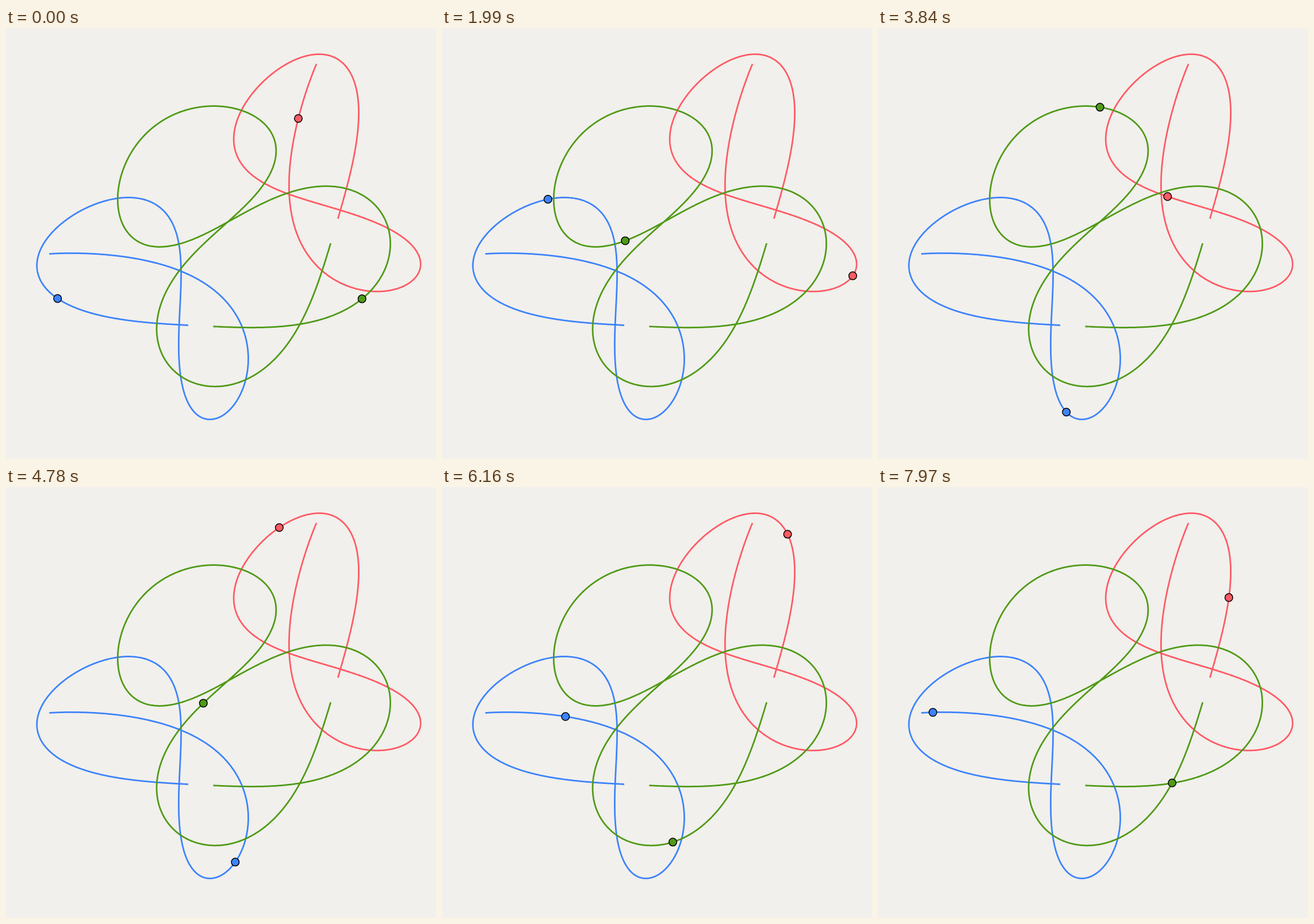
An HTML page that plays this animation: 748x749 px, repeating every 7990 ms.

```html
<!DOCTYPE html>
<html lang="en">
<head>
<meta charset="utf-8">
<title>Three-body orbit</title>
<style>
  html, body { margin: 0; width: 100%; height: 100%; overflow: hidden; background: #f1f0ec; }
  svg { display: block; width: 100%; height: 100%; }
  polyline { fill: none; stroke-width: 2.75; stroke-linejoin: round; }
  circle { stroke: #000; stroke-width: 1.5; }
</style>
</head>
<body>
<svg id="stage" viewBox="0 0 748 749"></svg>
<script>
const start = performance.now();
const LOOP = 7990;
const DT = 4;
const CENTER = [405.83, 366];
const COLORS = ['#509a17', '#ff5a65', '#3d83fc']; // green, red, blue
const PAINT_ORDER = [1, 2, 0];

// Three equal masses under gravity. The orbit is mirror-symmetric in time about `mid`,
// and runs back along itself when two bodies collide, `turn` ms after `mid`.
// [apex distance, half gap, apex speed, gravity, axis angle, mid, turn]
const GUESS = [241, 215.5, 0.172, 19.4, -2.1874, 3184, 4282];
const UNIT = [0.5, 0.5, 0.0005, 0.05, 0.002, 2, 2];

// Waypoints: time, then x, y of green, red and blue (null = free).
const WAYPOINTS = [
  [-1050, null, null, 539.8, 62.2, null, null],
  [0, 618.5, 471, 508.5, 156, 90.5, 471],
  [1290, 515, 279.5, 627.5, 456.5, 75, 362],
  [2690, 207.5, 237, 707.5, 379, 303, 482],
  [3840, 390, 138, 499.5, 291, 328.5, 668.5],
  [4780, 344, 375, 475.5, 70.5, 398.5, 652.5],
  [6160, 399.5, 618, 601, 81, 217.5, 399],
  [7420, null, null, null, null, 75.2, 392.2],
  [7970, 511.5, 514, 610.5, 192.5, 95.5, 391]
];

function attract(pos, gravity, acc) {
  acc.fill(0);
  for (let i = 0; i < 4; i += 2) {
    for (let j = i + 2; j < 6; j += 2) {
      const dx = pos[j] - pos[i], dy = pos[j + 1] - pos[i + 1];
      const sq = dx * dx + dy * dy;
      const f = gravity / (sq * Math.sqrt(sq));
      acc[i] += f * dx; acc[i + 1] += f * dy;
      acc[j] -= f * dx; acc[j + 1] -= f * dy;
    }
  }
}

// Positions every DT ms from `mid` on; x runs along the symmetry axis.
function simulate([g, h, v, gravity], duration) {
  const u = 0.75 * g * v / h; // zero total angular momentum
  const pos = [g, 0, -g / 2, h, -g / 2, -h];
  const vel = [0, v, u, -v / 2, -u, -v / 2];
  const acc = [0, 0, 0, 0, 0, 0];
  const track = [pos.slice()];
  attract(pos, gravity, acc);
  for (let t = 0; t < duration; t += DT) {
    for (let i = 0; i < 6; i++) {
      vel[i] += acc[i] * DT / 2;
      pos[i] += vel[i] * DT;
    }
    attract(pos, gravity, acc);
    for (let i = 0; i < 6; i++) vel[i] += acc[i] * DT / 2;
    track.push(pos.slice());
    if (Math.hypot(pos[0] - pos[2], pos[1] - pos[3]) < 22) {
      const x = (pos[0] + pos[2]) / 2, y = (pos[1] + pos[3]) / 2;
      track.push([x, y, x, y, pos[4], pos[5]]);
      break;
    }
  }
  return track;
}

function phase(t, [, , , , , mid, turn]) {
  const age = Math.abs(t - mid);
  return Math.min(age, 2 * turn - age);
}

// Stage coordinates of green, red and blue at time t.
function locate(t, orbit, track) {
  const [, , , , angle, mid] = orbit;
  const last = track.length - 1;
  const at = Math.max(0, Math.min(phase(t, orbit) / DT, last));
  const i = Math.floor(at), a = track[i], b = track[Math.min(i + 1, last)];
  let p = a.map((x, n) => x + (b[n] - x) * (at - i));
  if (t < mid) p = [p[0], -p[1], p[4], -p[5], p[2], -p[3]];
  const c = Math.cos(angle), s = Math.sin(angle);
  const out = [];
  for (let n = 0; n < 6; n += 2) {
    out.push(CENTER[0] + p[n] * c - p[n + 1] * s, CENTER[1] + p[n] * s + p[n + 1] * c);
  }
  return out;
}

const dot = (a, b) => a.reduce((sum, x, i) => sum + x * b[i], 0);

function solve(a, b) {
  const n = b.length;
  for (let i = 0; i < n; i++) {
    for (let r = i + 1; r < n; r++) {
      const f = a[r][i] / a[i][i];
      for (let c = i; c < n; c++) a[r][c] -= f * a[i][c];
      b[r] -= f * b[i];
    }
  }
  for (let i = n - 1; i >= 0; i--) {
    for (let c = i + 1; c < n; c++) b[i] -= a[i][c] * b[c];
    b[i] /= a[i][i];
  }
  return b;
}

// Damped least squares through the waypoints that lie within `reach` ms of `mid`.
function refine(orbit, reach) {
  const used = WAYPOINTS.filter(([t]) => phase(t, GUESS) <= reach);
  const errors = q => {
    const track = simulate(q, reach + 60);
    return used.flatMap(([t, ...goal]) => {
      const p = locate(t, q, track);
      return goal.map((x, i) => x === null ? 0 : p[i] - x);
    });
  };
  let damping = 1, best = errors(orbit);
  for (let round = 0; round < 12; round++) {
    const slopes = orbit.map((_, i) => {
      const q = orbit.slice();
      q[i] += UNIT[i];
      return errors(q).map((e, n) => e - best[n]);
    });
    const normal = slopes.map((a, i) => slopes.map((b, j) => dot(a, b) + (i === j ? damping : 0)));
    const delta = solve(normal, slopes.map(a => -dot(a, best)));
    const next = orbit.map((x, i) => x + delta[i] * UNIT[i]);
    const trial = errors(next);
    if (dot(trial, trial) < dot(best, best)) {
      orbit = next;
      best = trial;
      damping /= 4;
    } else {
      damping *= 4;
    }
  }
  return orbit;
}

const orbit = [1000, 2000, 3300, 4300].reduce(refineStage, GUESS);
function refineStage(current, reach) { return refine(current, reach); }

const [mid, turn] = orbit.slice(5);
const track = simulate(orbit, turn + 20);
const stage = document.getElementById('stage');

function add(tag, attributes) {
  const node = document.createElementNS(stage.namespaceURI, tag);
  for (const name in attributes) node.setAttribute(name, attributes[name]);
  return stage.appendChild(node);
}

const trails = [[], [], []];
for (let age = -turn; age <= turn; age += DT) {
  const p = locate(mid + age, orbit, track);
  trails.forEach((trail, i) => trail.push(p[2 * i].toFixed(2) + ',' + p[2 * i + 1].toFixed(2)));
}
PAINT_ORDER.forEach(i => add('polyline', { points: trails[i].join(' '), stroke: COLORS[i] }));

const bodies = [];
PAINT_ORDER.forEach(i => { bodies[i] = add('circle', { r: 6.8, fill: COLORS[i] }); });

function draw() {
  const p = locate((performance.now() - start) % LOOP, orbit, track);
  bodies.forEach((body, i) => {
    body.setAttribute('cx', p[2 * i].toFixed(2));
    body.setAttribute('cy', p[2 * i + 1].toFixed(2));
  });
  requestAnimationFrame(draw);
}
draw();
</script>
</body>
</html>
```
